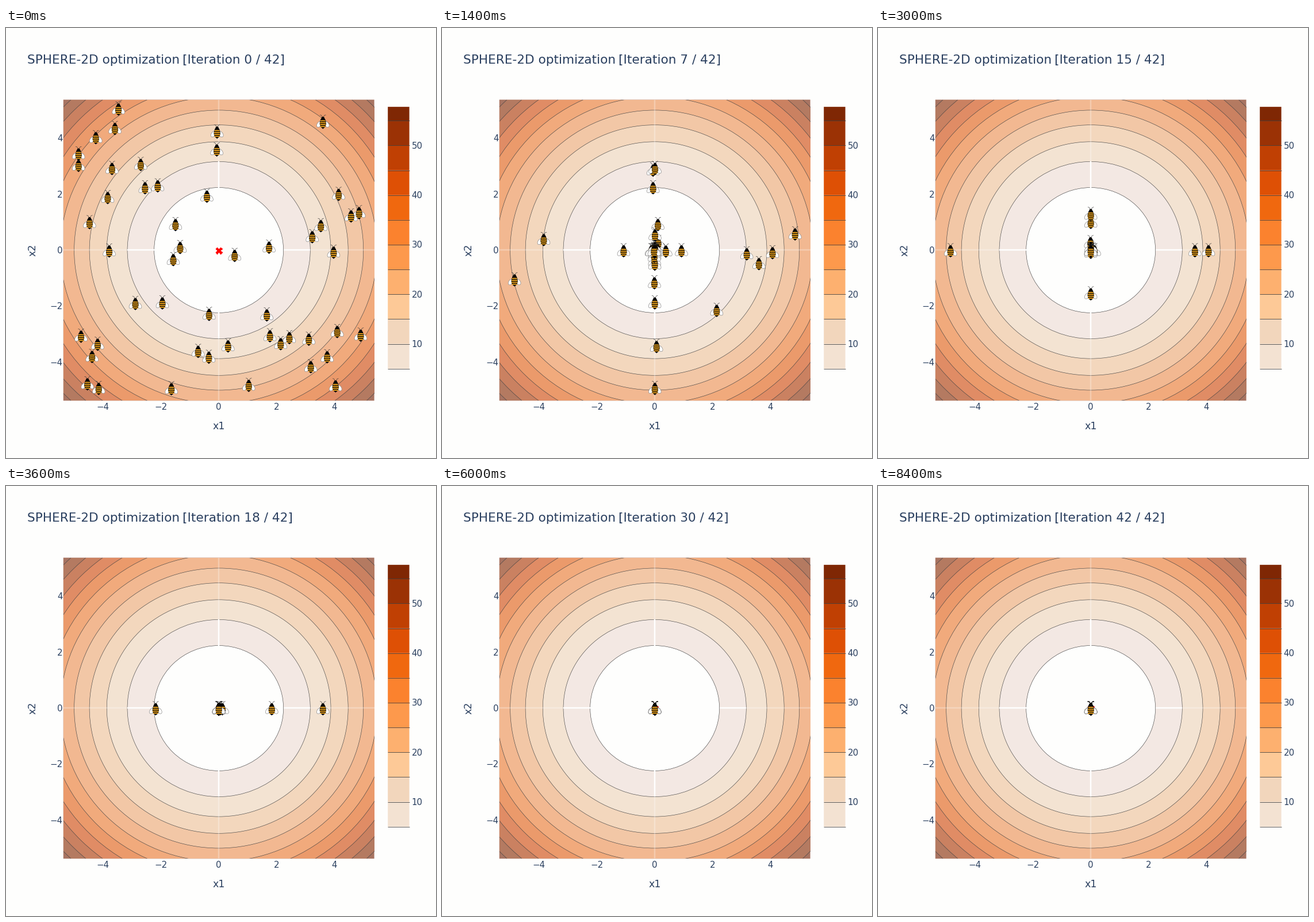
Animation, 748 px wide and 748 px high, one loop 8.6 s. Source, as a matplotlib script:

```python
import numpy as np
import matplotlib.pyplot as plt
from matplotlib.animation import FuncAnimation
from matplotlib.collections import PathCollection
from matplotlib.patches import Ellipse, Rectangle
from matplotlib.path import Path
from matplotlib.transforms import Affine2D, IdentityTransform

SIZE, DPI = 748, 100
ITERS = 42
PT = 72 / DPI
UNIT = SIZE / 600              # layout is designed on a 600 px grid
INK = "#2a3f5f"
LEFT, TOP, RIGHT, BOTTOM = 80 * UNIT, 100 * UNIT, 640.6, 520 * UNIT
CX, CY = (LEFT + RIGHT) / 2, (TOP + BOTTOM) / 2
REACH = 5.375                  # data range on either side of the origin
UX, UY = (RIGHT - CX) / REACH, (BOTTOM - CY) / REACH
PEAK, STEP = 57.8, 5

RINGS = ["#fefefd", "#f3e8e3", "#f3e3d2", "#f3d7bd", "#f2c7a6", "#f2b891",
         "#f1aa7c", "#eb9a6b", "#e08c65", "#ca8161", "#b47a61", "#a87462"]
BAR = ["#f3e2d2", "#f2d6bc", "#fdc997", "#fdb06f", "#fd994c", "#fb822e",
       "#f0680f", "#de5005", "#c04003", "#9b3205", "#7f2704"]

plt.rcParams["font.family"] = "DejaVu Sans"
fig = plt.figure(figsize=(SIZE / DPI, SIZE / DPI), dpi=DPI, facecolor="#fefefd")
ax = fig.add_axes([0, 0, 1, 1])
ax.set(xlim=(0, SIZE), ylim=(SIZE, 0))
ax.axis("off")


def label(x, y, s, px, ha="center"):
    """Text whose digits are centred on y."""
    return ax.text(x, y + 0.365 * px, s, fontsize=px * PT, color=INK,
                   ha=ha, va="baseline")


def box(x, y, w, h, color):
    return ax.add_patch(Rectangle((x, y), w, h, fc=color, ec="none", snap=False))


def draw_contours():
    frame = box(LEFT, TOP, RIGHT - LEFT, BOTTOM - TOP, RINGS[-1])
    for k in range(len(RINGS) - 2, -1, -1):
        r = np.sqrt(STEP * (k + 1))
        ring = Ellipse((CX, CY), 2 * r * UX, 2 * r * UY, fc=RINGS[k],
                       ec="#444444", lw=0.5 * UNIT * PT)
        ax.add_patch(ring)
        ring.set_clip_path(frame)


def draw_zero_lines():
    for sign in (-1, 1):
        stops = sign * np.array([np.sqrt(STEP), np.sqrt(2 * STEP), REACH])
        xs, ys = CX + stops * UX, CY + stops * UY
        for k, alpha in enumerate((1, 0.28)):
            style = dict(color="white", lw=2 * UNIT * PT, alpha=alpha,
                         solid_capstyle="butt")
            ax.plot(xs[k:k + 2], (CY, CY), **style)
            ax.plot((CX, CX), ys[k:k + 2], **style)


def draw_axes():
    for v in range(-4, 5, 2):
        text = str(v).replace("-", "\u2212")
        label(CX + v * UX, 659, text, 12 * UNIT)
        label(98.5, CY - v * UY, text, 12 * UNIT, "right")
    label(CX, 692, "x1", 14 * UNIT)
    ax.text(47, CY, "x2", fontsize=14 * UNIT * PT, color=INK, rotation=90,
            ha="center", va="center")


def draw_colorbar():
    x, width, pad = 664.2, 30 * UNIT, 10 * UNIT

    def level_y(v):
        return BOTTOM - pad - v / PEAK * (BOTTOM - TOP - 2 * pad)

    for k, color in enumerate(BAR):
        low = STEP * (k + 1)
        top = level_y(min(low + STEP, PEAK))
        box(x, top, width, level_y(low) - top, color)
        ax.plot((x, x + width), (level_y(low),) * 2, color="#333333", lw=0.55,
                solid_capstyle="butt")
        if low % 10 == 0:
            label(705.5, level_y(low), str(low), 12 * UNIT, "left")
    # the final level is a multiple of STEP only, so its label is skipped


def oval(x, y, w, h, angle=0):
    shape = Affine2D().scale(w / 2, h / 2).rotate_deg(angle).translate(x, y)
    return Path.unit_circle().transformed(shape)


def stripe(y, h=1.8):
    """Slightly bowed band as wide as the abdomen at that height."""
    w = 5.2 * np.sqrt(1 - ((y + 3) / 9) ** 2)
    return Path([(-w, y), (0, y + 1.2), (w, y), (w, y - h),
                 (0, y - h + 1), (-w, y - h), (-w, y)],
                [1, 3, 3, 2, 3, 3, 2])


def antenna(side):
    return Path([(side, 7.5), (side * 2, 12), (side * 5.2, 11.6)], [1, 3, 3])


def bee_parts():
    """Parts in pixels, y up: path, fill, edge, edge width."""
    black, gold = ("#080604", "none", 0), ("#f4a81c", "none", 0)
    sides = (-1, 1)
    return (
        [(oval(s * 6.4, -4.6, 7.2, 11.5, s * 36), "white", "#8c8c8c", 0.5) for s in sides]
        + [(antenna(s), "none", "#333333", 0.45) for s in sides]
        + [(oval(0, 6, 5.4, 5.2), *black),
           (oval(0, 3, 8.4, 7), *black),
           (oval(0, -3, 11.2, 17), *black),
           (Path([(-2.4, -10), (2.4, -10), (0, -12.8), (-2.4, -10)]), *black)]
        + [(stripe(y), *gold) for y in np.linspace(2, -8, 4)])


# Slow bees: start, spot on the first plateau, iteration of arrival at the optimum
SLOW = np.array([
    (-4.85, 3.05, -4.85, -1.04, 21),
    (-3.84, 1.90, -3.84, 0.40, 12),
    (-2.55, 2.25, -0.06, 2.25, 18),
    (-0.06, 4.24, -0.06, 2.88, 18),
    (3.60, 4.59, 3.60, -0.46, 25),
    (3.97, -0.05, 4.07, -0.07, 20),
    (4.85, 1.36, 4.85, 0.60, 11),
    (0.32, -3.40, 0.06, -3.42, 17),
    (2.14, -3.32, 2.14, -2.13, 10),
    (3.18, -4.14, 3.18, -0.11, 11)])
CROWD = 40


def crowd_path():
    """Each iteration a coordinate may jump to a small share of its old value."""
    rng = np.random.default_rng(11)
    start = rng.uniform(-5.1, 5.1, (CROWD, 2))
    shape = (ITERS + 1, CROWD, 2)
    shrink = np.where(rng.random(shape) < 0.35, rng.uniform(-0.3, 0.3, shape), 1)
    shrink[0] = 1
    return start * shrink.cumprod(axis=0)


def slow_spots(t):
    """x hops first, then y; the minor axis settles before the major one."""
    start, rest, arrive = SLOW[:, :2], SLOW[:, 2:4], SLOW[:, 4:]
    pos = np.where(t >= np.array([2, 5]), rest, start)
    minor = np.abs(rest) < np.abs(rest).max(axis=1, keepdims=True)
    pos = np.where(minor & (t >= 9), 0, pos)
    pos = np.where(t >= arrive - 4, 0.45 * pos, pos) if t > 7 else pos
    return np.where(t >= arrive, 0, pos)


BEE = bee_parts()
CROWD_PATH = crowd_path()


def swarm(t):
    spots = np.vstack([slow_spots(t), CROWD_PATH[t]])
    return np.repeat((CX, CY) + spots * (UX, -UY), len(BEE), axis=0)


draw_contours()
draw_zero_lines()
draw_axes()
draw_colorbar()
label(37, 53.8, "SPHERE-2D optimization", 21.7, "left")
counter = label(307.5, 53.8, "", 21.7, "left")
ax.plot([CX], [CY + 0.5], marker="X", ms=13 * PT, mfc="red", mec="none", zorder=4)

paths, fills, edges, widths = zip(*BEE)
bees = PathCollection(paths, facecolors=fills, edgecolors=edges, linewidths=widths,
                      offsets=swarm(0), offset_transform=ax.transData,
                      transform=IdentityTransform(), zorder=5)
ax.add_collection(bees, autolim=False)


def update(t):
    counter.set_text(f"[Iteration {t} / {ITERS}]")
    bees.set_offsets(swarm(t))
    return counter, bees


anim = FuncAnimation(fig, update, frames=ITERS + 1, interval=200,
                     repeat=True, repeat_delay=0, blit=False)
plt.show()
```
